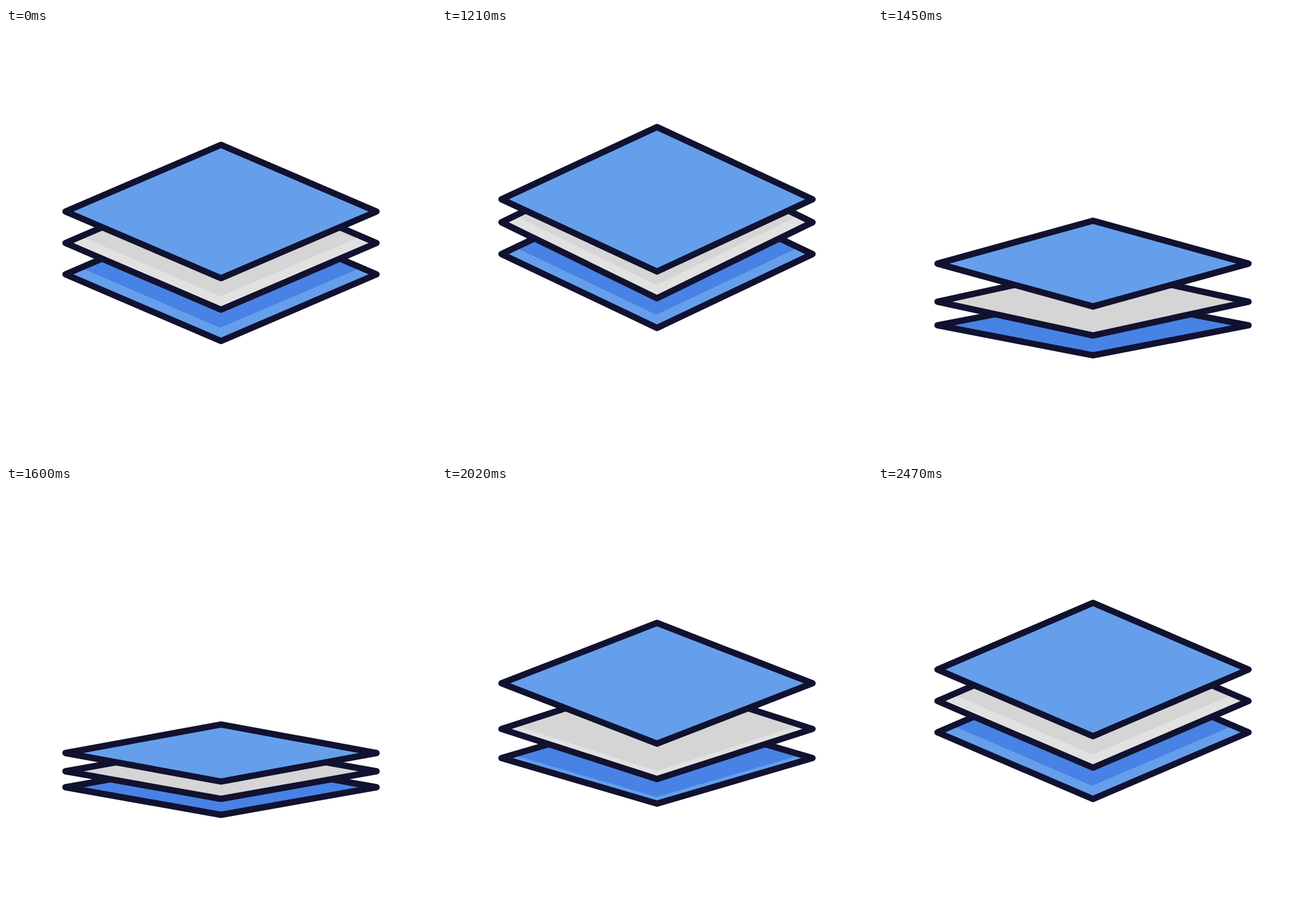
These frames come from a looping animation (748x748 px, 2.53 s). An HTML page:

```html
<!DOCTYPE html>
<html lang="en">
<head>
<meta charset="utf-8">
<title>Layers</title>
<style>
  html, body { margin: 0; width: 100%; height: 100%; overflow: hidden; background: #fff; }
  svg { display: block; width: 100%; height: 100%; }
  .edge { fill: none; stroke: #11122f; stroke-width: 11; stroke-linejoin: round; }
</style>
</head>
<body>
<svg id="stage" viewBox="0 0 748 748"></svg>
<script>
const LOOP = 2530, STEP = 30, MID = 374, HALF = 270.5;
const NS = "http://www.w3.org/2000/svg";
const stage = document.getElementById("stage");

// Poses are [centre y, half height]; times: lift start, lift end, drop end,
// rise start, rise end, settle end. Listed from back to front.
const layers = [
  { fill: "#659fec", shade: "#4882e5", skew: 0.07,
    rest: [428.5, 116], high: [387, 132.3], low: [524, 48],
    times: [1002, 1172, 1557, 1655, 2188, 2458] },
  { fill: "#e1e1e1", shade: "#d5d5d5", skew: 0.04,
    rest: [374, 116], high: [337.5, 132.3], low: [496.3, 48],
    times: [1053, 1225, 1610, 1690, 2140, 2410] },
  { fill: "#659fec",
    rest: [319.2, 116], high: [283.9, 132.1], low: [468, 48],
    times: [1127, 1299, 1666, 1690, 2095, 2349] }
];

const smooth = x => x * x * (3 - 2 * x);
const lift = x => x + x * x - x * x * x;

// Bezier easing with flat ends: control points (x1, 0) and (x2, 1).
function bezier(x1, x2) {
  return x => {
    let lo = 0, hi = 1;
    for (let i = 0; i < 24; i++) {
      const u = (lo + hi) / 2, v = 1 - u;
      if (3 * v * v * u * x1 + 3 * v * u * u * x2 + u * u * u < x) lo = u;
      else hi = u;
    }
    return smooth((lo + hi) / 2);
  };
}
const drop = bezier(0.3, 0.2);
const rise = bezier(0.905, 0.76);

function blend(a, b, ease, t, from, to) {
  const k = ease(Math.min(1, Math.max(0, (t - from) / (to - from))));
  return a.map((v, i) => v + (b[i] - v) * k);
}

function pose({ rest, high, low, times: [a, b, c, d, e, f] }, t) {
  if (t < b) return blend(rest, high, lift, t, a, b);
  if (t < d) return blend(high, low, drop, t, b, c);
  if (t < e) return blend(low, high, rise, t, d, e);
  return blend(high, rest, smooth, t, e, f);
}

function add(attrs) {
  const el = document.createElementNS(NS, "polygon");
  for (const key in attrs) el.setAttribute(key, attrs[key]);
  return stage.appendChild(el);
}

for (const layer of layers) {
  layer.face = add({ fill: layer.fill });
  if (layer.shade) layer.shadow = add({ fill: layer.shade });
  layer.edge = add({ class: "edge" });
}

// Diamond whose two lower sides are moved up by `cut`.
function diamond(y, h, cut = 0, skew = 0) {
  const side = HALF * (1 - cut / (2 * h)), sideY = y - cut / 2;
  return [
    [MID, y - h], [MID + side, sideY],
    [MID - cut * skew, y + h - cut], [MID - side, sideY]
  ].map(p => p.map(v => v.toFixed(2)).join()).join(" ");
}

function draw(t) {
  for (const layer of layers) {
    const [y, h] = pose(layer, t);
    const shape = diamond(y, h);
    layer.face.setAttribute("points", shape);
    layer.edge.setAttribute("points", shape);
    if (layer.shadow) {
      const cut = Math.min(23, 7 + (h - 66) * 0.33);
      layer.shadow.setAttribute("points", diamond(y, h, cut, layer.skew));
    }
  }
}

const start = performance.now();
function tick(now) {
  const t = Math.round(Math.max(0, now - start)) % LOOP;
  draw(Math.floor((t - 10) / STEP) * STEP + 10);
  requestAnimationFrame(tick);
}
draw(0);
requestAnimationFrame(tick);
</script>
</body>
</html>
```
